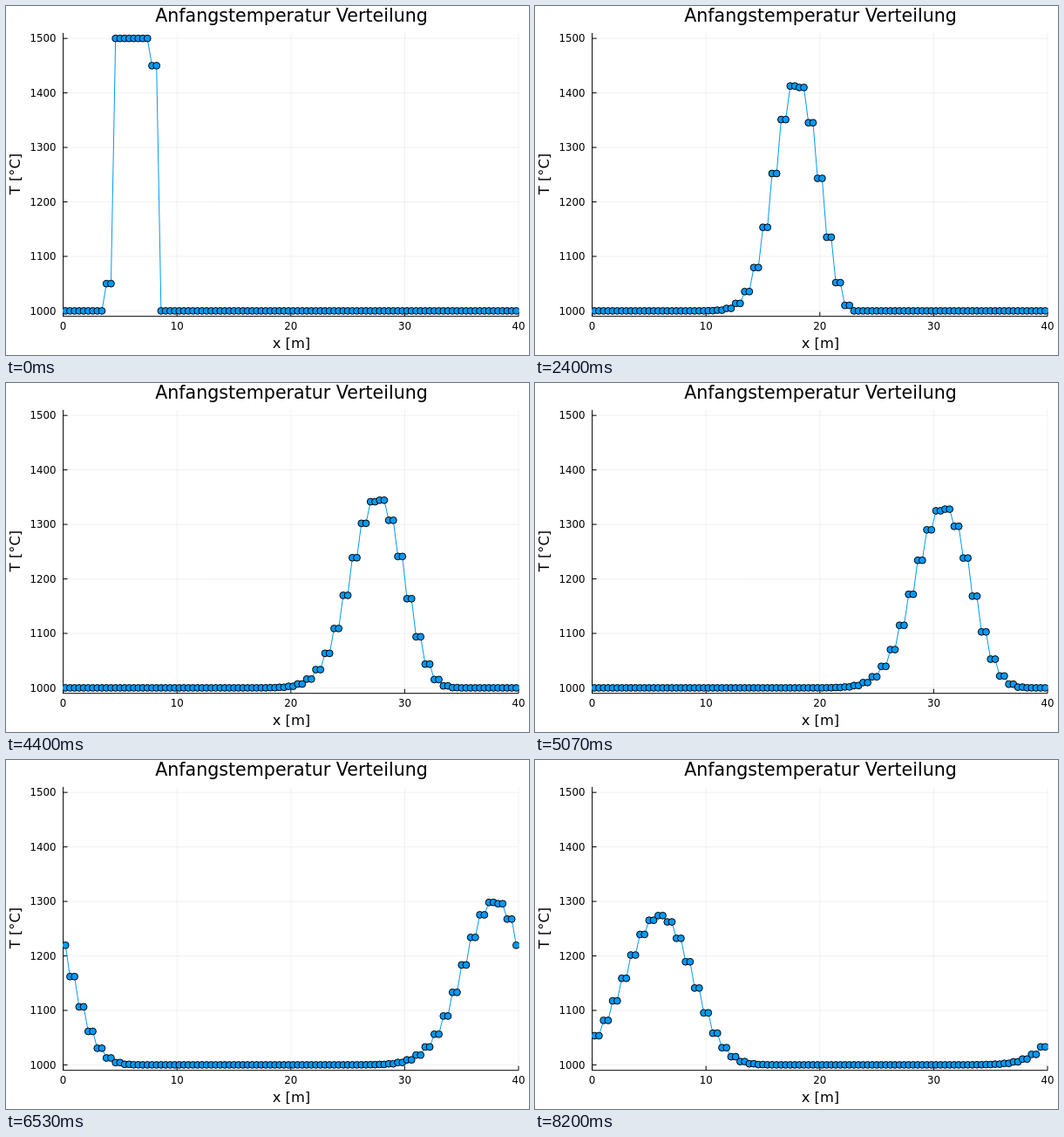
Animation of 600x400 px, one loop 8270 ms. Source, as an HTML page with a canvas:

```html
<!DOCTYPE html>
<html lang="de">
<head>
<meta charset="utf-8">
<title>Anfangstemperatur Verteilung</title>
<style>
  html, body { margin: 0; width: 600px; height: 400px; overflow: hidden; background: #fff; }
  canvas { display: block; width: 600px; height: 400px; }
</style>
</head>
<body>
<canvas id="plot" width="600" height="400"></canvas>
<script>
const ctx = document.getElementById('plot').getContext('2d');
const LOOP = 8270, FRAMES = 124, CELLS = 100;
const COURANT = 0.8;
const BLUE = '#009afa';
const LEFT = 65.6, RIGHT = 588, TOP = 30.9, BOTTOM = 355.7;

const px = x => LEFT + x * (RIGHT - LEFT) / 40;
const py = T => BOTTOM - (T - 990) * (BOTTOM - TOP) / 520;

// Lax scheme for advection on a periodic rod
function advance(T) {
  const a = (1 + COURANT) / 2;
  return T.map((_, i) =>
    a * T[(i + CELLS - 1) % CELLS] + (1 - a) * T[(i + 1) % CELLS]);
}

const states = [];
let state = Array.from({ length: CELLS }, (_, i) => i >= 10 && i < 20 ? 1500 : 1000);
for (let k = 0; k < FRAMES; k++) states.push(state = advance(state));

function line(x1, y1, x2, y2) {
  ctx.beginPath();
  ctx.moveTo(x1, y1);
  ctx.lineTo(x2, y2);
  ctx.stroke();
}

function text(str, x, y, size, align = 'center') {
  ctx.font = size + 'px "DejaVu Sans", sans-serif';
  ctx.textAlign = align;
  ctx.fillText(str, x, y);
}

function drawAxes() {
  const xTicks = [0, 10, 20, 30, 40];
  const yTicks = [1000, 1100, 1200, 1300, 1400, 1500];

  ctx.lineWidth = 1;
  ctx.strokeStyle = 'rgba(0,0,0,0.06)';
  xTicks.forEach(v => line(px(v), TOP, px(v), BOTTOM));
  yTicks.forEach(v => line(LEFT, py(v), RIGHT, py(v)));

  ctx.strokeStyle = ctx.fillStyle = '#000';
  line(LEFT, BOTTOM, RIGHT, BOTTOM);
  line(LEFT, BOTTOM, LEFT, TOP);
  for (const v of xTicks) {
    line(px(v), BOTTOM, px(v), BOTTOM - 5);
    text(v, px(v), 371.3, 11.8);
  }
  for (const v of yTicks) {
    line(LEFT, py(v), LEFT + 5, py(v));
    text(v, 57.5, py(v) + 4.3, 11.8, 'right');
  }

  text('Anfangstemperatur Verteilung', 327.5, 18.3, 20.6);
  text('x [m]', 327.5, 392, 16.3);
  ctx.save();
  ctx.translate(16.3, 192.5);
  ctx.rotate(-Math.PI / 2);
  text('T [°C]', 0, 0, 16.3);
  ctx.restore();
}

function drawSeries(T) {
  const points = T.map((v, i) => [px(0.2 + 0.4 * i), py(v)]);
  ctx.save();
  ctx.beginPath();
  ctx.rect(65, 30, 523.5, 326);
  ctx.clip();

  ctx.lineWidth = 1;
  ctx.strokeStyle = BLUE;
  ctx.beginPath();
  points.forEach(([x, y]) => ctx.lineTo(x, y));
  ctx.stroke();

  ctx.fillStyle = BLUE;
  ctx.strokeStyle = '#000';
  for (const [x, y] of points) {
    ctx.beginPath();
    ctx.arc(x, y, 3.9, 0, 2 * Math.PI);
    ctx.fill();
    ctx.stroke();
  }
  ctx.restore();
}

// Frames run at 15 per second, each start rounded to 10 ms
const startOf = k => Math.round(k * 20 / 3) * 10;

function frameAt(t) {
  let k = Math.floor(t * 0.015);
  if (startOf(k + 1) <= t) k++;
  else if (startOf(k) > t) k--;
  return Math.min(k, FRAMES - 1);
}

let shown = -1;
function draw(now) {
  const k = frameAt(Math.max(0, now) % LOOP);
  if (k !== shown) {
    shown = k;
    ctx.fillStyle = '#fff';
    ctx.fillRect(0, 0, 600, 400);
    drawAxes();
    drawSeries(states[k]);
  }
}

const begin = performance.now();
function tick() {
  draw(performance.now() - begin);
  requestAnimationFrame(tick);
}
tick();
</script>
</body>
</html>
```
